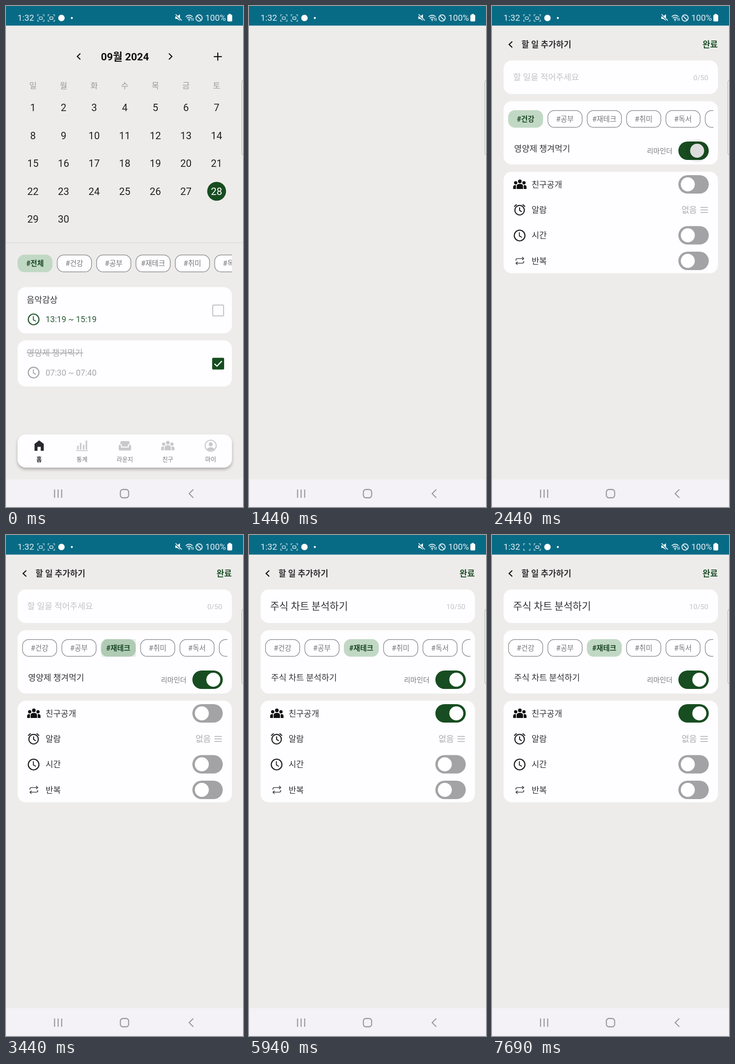
Animation, 515 px wide and 1087 px high, one loop 8000 ms. Source, as an HTML page:

```html
<!DOCTYPE html>
<html lang="ko">
<head>
<meta charset="utf-8">
<style>
  html, body { margin: 0; width: 100%; height: 100%; overflow: hidden; background: #edecea; }
  svg { display: block; width: 515px; height: 1087px; }
  text { font-family: Roboto, 'Noto Sans CJK KR', 'Noto Sans CJK', sans-serif; white-space: pre; }
</style>
</head>
<body>
<svg id="stage" viewBox="0 0 515 1087"></svg>
<script>
const LOOP = 8000;
const GREEN = '#174d20', MINT = '#c1d9c4', INK = '#333236', WHITE = '#fefdff';

// Text is placed by its left, middle or right edge and its vertical centre.
const text = (s, x, y, size, fill, { anchor = 'start', weight = 400, lift = .37, id = '' } = {}) =>
  `<text id="${id}" x="${x}" y="${y + size * lift}" font-size="${size}" fill="${fill}" text-anchor="${anchor}" font-weight="${weight}">${s}</text>`;
const box = (x, y, w, h, r, fill, extra = '') =>
  `<rect x="${x}" y="${y}" width="${w}" height="${h}" rx="${r}" fill="${fill}" ${extra}/>`;
const dot = (x, y, r, fill, extra = '') => `<circle cx="${x}" cy="${y}" r="${r}" fill="${fill}" ${extra}/>`;
const line = (d, stroke, width = 2, extra = '') =>
  `<path d="${d}" fill="none" stroke="${stroke}" stroke-width="${width}" ${extra}/>`;
const shape = (d, fill) => `<path d="${d}" fill="${fill}"/>`;
const at = (x, y, s) => `<g transform="translate(${x} ${y})">${s}</g>`;
const card = (y, h) => box(25, y, 466, h, 18, WHITE);

const clock = (x, y, color) => at(x, y,
  dot(0, 0, 11.6, 'none', `stroke="${color}" stroke-width="2.4"`) + line('M-.5 -7V.8L5 4', color, 2));
const people = (x, y, color) => at(x, y,
  dot(0, -6.5, 4, color) + dot(-9, -3.5, 3.6, color) + dot(9, -3.5, 3.6, color) +
  shape('M-7 10V4Q-7 -1 0 -1T7 4V10ZM-14.5 10V5Q-14 1 -8.5 1.5V10ZM14.5 10V5Q14 1 8.5 1.5V10Z', color));

function chips(id, names, x, y, right) {
  const items = names.map((name, i) => {
    const left = x + i * 85.5;
    return `<g class="chip">${box(left + .7, y + .7, 74.4, 36.6, 14, 'none', 'stroke-width="1.5"')}` +
      text('#' + name, left + 37.8, y + 18.8, 15.6, '#777', { anchor: 'middle' }) + '</g>';
  }).join('');
  return `<clipPath id="${id}Clip"><rect x="${x - 2}" y="${y - 2}" width="${right - x + 2}" height="44"/></clipPath>` +
    `<g id="${id}" clip-path="url(#${id}Clip)">${items}</g>`;
}

const toggle = (id, y) => `<g id="${id}">${box(405, y - 20, 66, 40, 20, '#a3a2a4')}` +
  `${dot(425.5, y, 25, '#000', 'opacity="0"')}${dot(425.5, y, 15.2, '#fff')}</g>`;

function calendar() {
  const mid = { anchor: 'middle' }, colX = i => 58.6 + i * 66.5;
  let s = text('09월 2024', 258.5, 109.5, 22.7, '#111', { anchor: 'middle', weight: 700, lift: .355 });
  s += line('M161.5 103L155 109.5L161.5 116M354 103L360.5 109.5L354 116M451.5 109.8H469M460.2 101V118.5', '#111', 2.3);
  [...'일월화수목금토'].forEach((d, i) => s += text(d, colX(i), 172.5, 17.6, '#9b9a9c', mid));
  s += dot(457.7, 402, 20.5, GREEN);
  for (let d = 1; d <= 30; d++) {
    const y = 220.3 + Math.floor((d - 1) / 7) * 60.5;
    s += text(d, colX((d - 1) % 7), y, 21.8, d === 28 ? '#fff' : '#222', { anchor: 'middle', lift: .355 });
  }
  return s + line('M0 513.5H515', '#dcdbd9', 1.5);
}

function todo(y, title, time, done) {
  const main = done ? '#a7a6a9' : '#2b5b35';
  return card(y, 100.5) + text(title, 45, y + 27, 18.2, done ? '#a7a6a9' : INK) +
    clock(60, y + 70, main) + text(time, 86, y + 70, 18, main, { lift: .355 }) +
    (done
      ? line(`M45 ${y + 27.5}H167.5`, '#a7a6a9', 1.5) + box(448, y + 38, 26, 25.5, 2.5, GREEN) +
        line(`M453 ${y + 51}L458.5 ${y + 56}L469 ${y + 45}`, '#fff', 2.4)
      : box(449.2, y + 38.8, 23.6, 23.6, 1.5, 'none', 'stroke="#c5c4c7" stroke-width="2.2"'));
}

function tabs() {
  const pale = '#c9c8cb';
  const icons = [
    shape('M-10 11V-4L0 -11.5L10 -4V11H3.5V2.5H-3.5V11Z', '#29282c'),
    line('M-12.5 10.5H13', pale, 2) + line('M-9 8V0M-3 8V-6M3.5 8V-2M9.5 8V-11', pale, 3.4),
    shape('M-10 -4V-7Q-10 -10 -7 -10H7Q10 -10 10 -7V-4Q6 -3 6 2H-6Q-6 -3 -10 -4Z', pale) +
      shape('M-13.5 1Q-13.5 -2 -11 -2T-8.5 1V4H8.5V1Q8.5 -2 11 -2T13.5 1V7Q13.5 10.5 10 10.5H-10Q-13.5 10.5 -13.5 7Z', pale),
    people(0, 0, pale),
    dot(0, 0, 12, 'none', `stroke="${pale}" stroke-width="2.2"`) + dot(0, -3, 4.4, pale) +
      shape('M-8.5 7.5Q0 -1 8.5 7.5Q0 14 -8.5 7.5Z', pale)
  ];
  return `<g style="filter:drop-shadow(0 4px 3px #0004)">${card(929.5, 72)}</g>` +
    ['홈', '통계', '라운지', '친구', '마이'].map((name, i) => at(72 + i * 93.2, 954, icons[i]) +
      text(name, 72 + i * 93.2, 983, 12.9, i ? '#777679' : '#29282c', { anchor: 'middle', weight: i ? 500 : 700 })).join('');
}

const home = () => calendar() +
  chips('filters', ['전체', '건강', '공부', '재테크', '취미', '독서'], 25.2, 539.5, 491) +
  todo(610, '음악감상', '13:19 ~ 15:19', false) + todo(725.3, '영양제 챙겨먹기', '07:30 ~ 07:40', true) + tabs();

function form() {
  const end = { anchor: 'end' };
  const alarm = dot(0, 1, 10.3, 'none', 'stroke="#222" stroke-width="2.3"') +
    line('M0 -5V1.5L4.5 4.5M-12 -6.5L-6.5 -11.3M12 -6.5L6.5 -11.3', '#222', 2.2);
  const repeat = line('M-8.5 -.5V-2Q-8.5 -5 -5.5 -5H8M5 -8.5L8.5 -5L5 -1.8M8.5 .5V2Q8.5 5 5.5 5H-8M-5 1.8L-8.5 5L-5 8.5', '#444', 1.7);
  const icons = [people(60.5, 387, '#111'), at(60, 442, alarm), clock(60, 498, '#222'), at(60.5, 553, repeat)];
  return line('M44 77L37.2 83.5L44 90', '#111', 2.4) +
    text('할 일 추가하기', 64, 83, 18, INK, { weight: 700 }) +
    text('완료', 490.5, 83, 18, '#1f4f2a', { anchor: 'end', weight: 700 }) +
    card(118, 73) + text('', 46, 154.5, 18.2, '#c3c2c6', { id: 'input' }) +
    text('', 470, 155, 15.5, '#c3c2c6', { anchor: 'end', id: 'count' }) +
    card(206.5, 137.5) + chips('topics', ['건강', '공부', '재테크', '취미', '독서', '운동'], 35.2, 226, 481) +
    `<clipPath id="pressClip"><rect x="206.3" y="226" width="75.6" height="38"/></clipPath>` +
    dot(262, 252, 0, '#174d20', 'id="press" clip-path="url(#pressClip)"') +
    text('', 48, 309, 18.2, INK, { id: 'tip' }) + text('리마인더', 392, 314, 15, '#777679', end) + toggle('reminder', 314) +
    card(359.5, 220.5) +
    ['친구공개', '알람', '시간', '반복'].map((s, i) => icons[i] + text(s, 86, 387 + i * 55.3, 18, INK)).join('') +
    text('없음', 445, 442, 18, '#aaa9ac', end) + line('M453 437H469M453 442.5H469M453 448H469', '#aaa9ac', 1.7) +
    toggle('friends', 387) + toggle('time', 497.5) + toggle('repeat', 553);
}

function statusBar() {
  const pale = '#e3f0f4';
  const frame = id => line('M-7 -3.5V-7H-4M4 -7H7V-3.5M-7 3.5V7H-4M4 7H7V3.5', pale, 1.4, 'opacity=".75"') +
    `<g id="${id}">${box(-3.4, -2.4, 6.8, 5.4, 1, 'none', `stroke="${pale}" stroke-width="1.4"`)}</g>`;
  return box(0, 0, 515, 42.5, 0, '#086b86') +
    text('1:32', 25, 25.7, 18.7, pale, { lift: .355 }) + at(75.7, 26, frame('lens')) + at(98.5, 26, frame('lens2')) +
    dot(120.5, 26, 7, '#fff') + dot(143, 26, 2.2, '#fff') +
    shape('M368 22.5H372L378 18V32L372 28H368Z', '#fff') + line('M368 18.5L381.5 32', '#086b86', 3.4) + line('M368.5 18L382 31.5', '#fff', 1.7) +
    line('M390.5 23.5Q398 16.5 405.5 23.5M393 26.5Q398 22 403 26.5M395.5 29.5Q398 27 400.5 29.5', pale, 1.7) +
    dot(398, 31.5, 1.3, pale) + line('M404 26V32M407 26V32', pale, 1.3) +
    dot(419.5, 26, 6.8, 'none', `stroke="${pale}" stroke-width="1.9"`) + line('M414.7 21.2L424.3 30.8', pale, 1.9) +
    text('100%', 433, 25.7, 18.6, pale, { lift: .355 }) + box(481, 19, 10.5, 14.5, 2, '#fff') + box(483.7, 17.3, 5, 3, 1, '#fff');
}

function systemBar() {
  const gray = '#9a999d';
  return box(0, 1027, 515, 60, 0, '#f4f2f6') + line('M105.5 1049V1067M113.2 1049V1067M121 1049V1067', gray, 2.3) +
    box(248.5, 1049, 18, 18, 5.5, 'none', `stroke="${gray}" stroke-width="2.3"`) +
    line('M407 1049L398 1058L407 1067', gray, 2.3);
}

const stage = document.getElementById('stage');
stage.innerHTML = box(0, 0, 515, 1087, 0, '#edecea') +
  `<g id="home">${home()}</g><g id="form">${form()}</g>` +
  box(512.5, 160.5, 12, 163, 5, '#f4f3f3', 'stroke="#bcbbbd" stroke-width="1.4"') + statusBar() + systemBar();

const $ = id => document.getElementById(id);
const set = (el, attrs) => { for (const k in attrs) el.setAttribute(k, attrs[k]); };
const ramp = (t, a, b) => Math.min(1, Math.max(0, (t - a) / (b - a)));
const easeOut = p => 1 - (1 - p) ** 3;

function pick(id, chosen) {
  [...$(id).children].forEach((chip, i) => {
    const on = i === chosen, [frame, label] = chip.children;
    set(frame, { fill: on ? MINT : WHITE, stroke: on ? MINT : '#929194' });
    set(label, { fill: on ? '#1c4726' : '#777679', 'font-weight': on ? 700 : 400 });
  });
}

function slide(id, t, start) {
  const [track, halo, knob] = $(id).children;
  const cx = 425.5 + 25 * easeOut(ramp(t, start, start + 200));
  const glow = t < start ? 0 : 1 - ramp(t, start + 90, start + 300);
  const shade = Math.round(255 - 34 * glow);
  set(track, { fill: t < start ? '#a3a2a4' : GREEN });
  set(halo, { cx, opacity: glow * .06 });
  set(knob, { cx, fill: `rgb(${shade},${shade},${shade})` });
}

function draw(t) {
  set($('home'), { opacity: 1 - ramp(t, 1120, 1320) });
  const enter = easeOut(ramp(t, 1700, 2000));
  set($('form'), { opacity: enter, transform: `translate(${-515 * (1 - enter)} 0)` });

  const blink = (t - 20 + LOOP) % 1200 < 300;
  set($('lens'), { opacity: blink ? 0 : .9 });

  pick('topics', t < 3300 ? 0 : 2);
  set($('press'), { r: t < 3260 ? 0 : 15 + 40 * ramp(t, 3260, 3440), opacity: .13 * (1 - ramp(t, 3400, 3560)) });
  slide('reminder', t, 2356);
  slide('friends', t, 5400);

  const plan = '주식 차트 분석하기', filled = t >= 4500;
  $('tip').textContent = t < 3600 ? '영양제 챙겨먹기' : plan;
  $('input').textContent = filled ? plan : '할 일을 적어주세요';
  set($('input'), { 'font-size': filled ? 21.5 : 18.2, fill: filled ? INK : '#c3c2c6', y: filled ? 162 : 161.2 });
  $('count').textContent = filled ? '10/50' : '0/50';
}

pick('filters', 0);
const begin = performance.now();
function tick() {
  draw((performance.now() - begin) % LOOP);
  requestAnimationFrame(tick);
}
tick();
</script>
</body>
</html>
```
